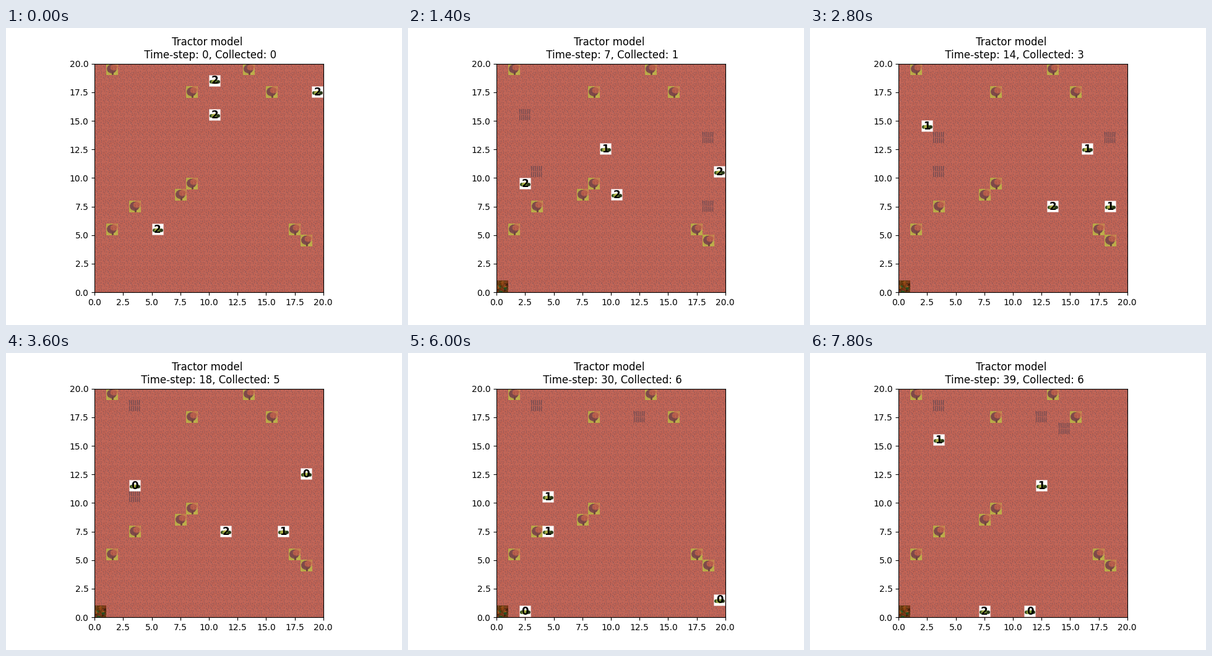
Write a matplotlib script that moves like this. It is 640x480 px and loops after 8000 ms.

```python
import numpy as np
import matplotlib.pyplot as plt
from matplotlib.animation import FuncAnimation

SIZE, STEPS, CAPACITY = 20, 40, 2
HOME = (0, 0)
TREES = {(1, 19), (13, 19), (8, 17), (15, 17), (8, 9),
         (7, 8), (3, 7), (1, 5), (17, 5), (18, 4)}
# cell of each crop: the step it shows up
CROPS = {(18, 7): 1, (2, 15): 1, (3, 10): 3, (9, 12): 4, (18, 13): 7,
         (3, 13): 13, (3, 18): 17, (12, 17): 28, (14, 16): 34}
# crops held back until a given step
OPENS = {(3, 10): 16}
# start cell and the cells to visit, in order
TRACTORS = [
    ((10, 18), [(9, 12), (18, 13), HOME]),
    ((10, 15), [(18, 7), (3, 10), (12, 17)]),
    ((19, 17), [(18, 7), (3, 10), (3, 18)]),
    ((5, 5), [(2, 15), (3, 13), HOME, (12, 17)]),
]
N = 54
rng = np.random.default_rng(4)


def advance(cell, goal):
    """One cell towards the goal: down, then sideways, then up."""
    dx, dy = np.sign(np.subtract(goal, cell))
    wanted = [(0, min(dy, 0)), (dx, 0), (0, max(dy, 0)), (1, 0)]
    for mx, my in wanted:
        new = (int(cell[0] + mx), int(cell[1] + my))
        if new != cell and new not in TREES:
            return new
    return cell


def simulate():
    """Cells and loads of all tractors for every step, and pick-up steps."""
    cells = [start for start, _ in TRACTORS]
    plans = [list(goals) for _, goals in TRACTORS]
    loads, taken = [0] * len(cells), {}
    history = [(cells[:], loads[:])]
    for step in range(1, STEPS):
        for i, plan in enumerate(plans):
            while plan and plan[0] in taken:
                plan.pop(0)
            if not plan or OPENS.get(plan[0], 0) >= step:
                continue
            cells[i] = advance(cells[i], plan[0])
            if cells[i] == plan[0]:
                plan.pop(0)
                if cells[i] == HOME:
                    loads[i] = 0
                else:
                    loads[i] += 1
                    taken[cells[i]] = step
        history.append((cells[:], loads[:]))
    return history, taken


def square(color):
    img = np.ones((N, N, 4))
    img[..., :3] = np.array(color) / 255
    return img


def blob(img, cx, cy, rx, ry, color):
    """Paint an ellipse; centre and radii are fractions of the cell."""
    y, x = (np.mgrid[:N, :N] + 0.5) / N
    inside = ((x - cx) / rx) ** 2 + ((y - cy) / ry) ** 2 < 1
    img[inside, :3] = np.array(color) / 255


def speckle(img, amount):
    grain = rng.normal(0, amount, (N // 3, N // 3)).repeat(3, 0).repeat(3, 1)
    img[..., :3] = np.clip(img[..., :3] + grain[..., None], 0, 1)
    return img


def soil():
    n, gap = 20, 4
    tile = np.array([191, 100, 86]) / 255 + rng.normal(0, 0.02, (n, n, 1))
    for y in range(0, n, gap):
        for x in range(0, n, gap):
            fx, fy = rng.integers(0, gap, 2)
            for j in range(2):
                tile[(y + fy + j) % n, (x + fx) % n] = np.array([142, 86, 87]) / 255
    return np.tile(np.clip(tile, 0, 1), (SIZE, SIZE, 1))


def tree():
    img = square((187, 172, 72))
    blob(img, 0.72, 0.30, 0.34, 0.34, (198, 128, 80))
    blob(img, 0.46, 0.47, 0.41, 0.38, (126, 74, 74))
    blob(img, 0.63, 0.36, 0.28, 0.25, (182, 94, 76))
    blob(img, 0.55, 0.86, 0.08, 0.16, (112, 68, 66))
    return speckle(img, 0.03)


def tractor():
    img = square((255, 255, 255))
    for k, color in enumerate([(48, 74, 26), (150, 164, 66), (206, 200, 80),
                               (104, 134, 48), (40, 56, 24)]):
        blob(img, 0.2 + 0.15 * k, 0.58, 0.15, 0.19 - 0.02 * abs(k - 2), color)
    rim = np.ones((N, N), bool)
    rim[2:-2, 2:-2] = False
    img[rim, 3] = 0.4
    return img


def base():
    img = square((108, 62, 20))
    palette = [(44, 84, 34), (150, 76, 24), (70, 34, 14), (124, 56, 24)]
    for k in range(24):
        cx, cy = rng.random(2)
        blob(img, cx, cy, 0.13, 0.11, palette[k % len(palette)])
    return speckle(img, 0.05)


def crop():
    img = square((92, 68, 80))
    y, x = np.mgrid[:N, :N]
    img[..., 3] = np.where((x % 9 < 4) & (y % 27 < 24), 0.75, 0.0)
    return img


def box(x, y):
    return (x, x + 1, y, y + 1)


fig, ax = plt.subplots(figsize=(6.4, 4.8), dpi=100)
ax.imshow(soil(), extent=(0, SIZE, 0, SIZE), zorder=0)
ax.set(xlim=(0, SIZE), ylim=(0, SIZE), aspect="equal")
ticks = np.arange(0, SIZE + 1, 2.5)
ax.set_xticks(ticks)
ax.set_yticks(ticks)


def place(img, cell, z):
    return ax.imshow(img, extent=box(*cell), zorder=z)


history, taken = simulate()
tree_img, crop_img, tractor_img = tree(), crop(), tractor()
for cell in TREES:
    place(tree_img, cell, 1)
crops = {cell: place(crop_img, cell, 1.1) for cell in CROPS}
bodies = [place(tractor_img, start, 1.2) for start, _ in TRACTORS]
home = place(base(), HOME, 1.3)
labels = [ax.text(0, 0, "", ha="center", va="center", fontsize=12,
                  fontweight="bold", zorder=3) for _ in TRACTORS]
title = ax.set_title("")


def update(step):
    home.set_visible(step > 0)
    for cell, art in crops.items():
        art.set_visible(CROPS[cell] <= step < taken.get(cell, STEPS))
    for (x, y), load, body, label in zip(*history[step], bodies, labels):
        body.set_extent(box(x, y))
        label.set_position((x + 0.5, y + 0.5))
        label.set_text(str(CAPACITY - load))
    got = sum(when <= step for when in taken.values())
    title.set_text(f"Tractor model \n Time-step: {step}, Collected: {got}")
    return [title, home, *crops.values(), *bodies, *labels]


anim = FuncAnimation(fig, update, frames=STEPS, interval=200,
                     repeat=True, repeat_delay=0)
plt.show()
```
